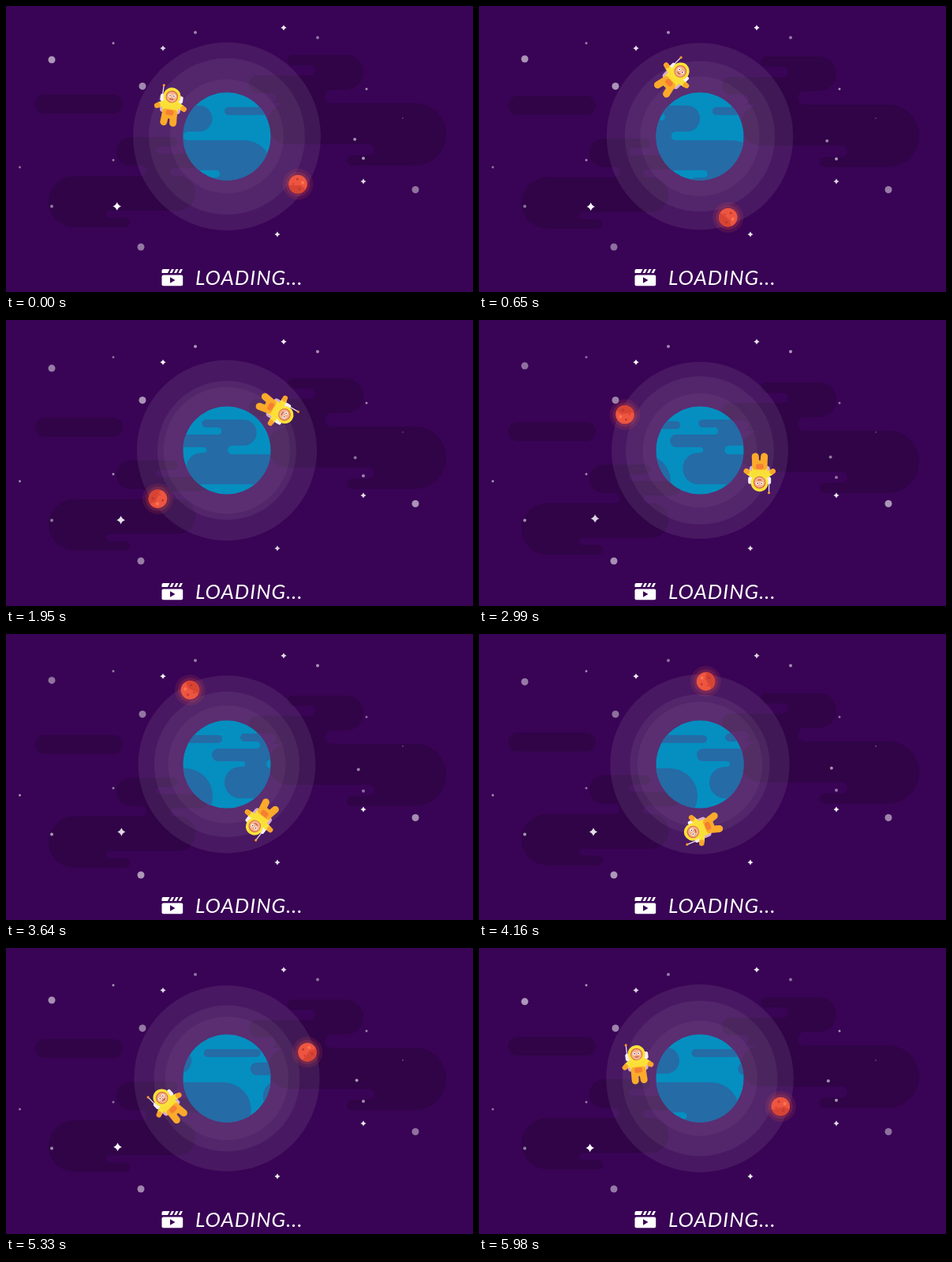
Write an HTML page that moves like this. It is 592 px wide and 362 px high and loops after 6.11 s.

```html
<!DOCTYPE html>
<html lang="en">
<head>
<meta charset="utf-8">
<title>Loading</title>
<style>
  html, body { margin: 0; width: 100%; height: 100%; overflow: hidden; background: #390455; }
  svg { display: block; width: 592px; height: 362px; }
  text { font: italic 26px Lato, "Open Sans", sans-serif; letter-spacing: 1px; fill: #fff; }
</style>
</head>
<body>
<svg viewBox="0 0 592 362">
  <defs>
    <clipPath id="globe"><circle cx="280" cy="165" r="55.7"/></clipPath>
    <g id="land"><rect x="277" y="128" width="72" height="10" rx="5"/></g>
    <path id="arm" d="M0 0H7" stroke="#fbe339" stroke-width="7"/>
    <path id="hand" d="M9 0H10.500" stroke="#fba52d" stroke-width="6.500"/>
    <path id="leg" d="M0 0V13" stroke="#fbaa2b" stroke-width="9"/>
  </defs>

  <g id="clouds" fill="#300447"><rect x="37" y="112" width="111" height="24" rx="12"/></g>
  <g id="stars" fill="#fff"></g>
  <g id="rings" fill="#fff" transform="translate(280 165)">
    <circle opacity=".08"/><circle opacity=".055"/><circle opacity=".04"/>
  </g>

  <g clip-path="url(#globe)">
    <circle cx="280" cy="165" r="55.7" fill="#048fc0"/>
    <g id="surface" fill="#256ba6"><use href="#land"/><use href="#land" x="-180"/></g>
  </g>

  <g id="moon">
    <g transform="translate(106.8)" fill="#ee5540">
      <circle r="19.500" opacity=".12"/>
      <circle r="15.500" opacity=".18"/>
      <circle r="11.800"/>
      <path d="M-9 7.500A11.800 11.800 0 0 0 11.800 0L4-1z" fill="#d84434"/>
      <g fill="#c23a31"><circle cx="-4" cy="-5" r="1.500"/><circle cx="5" cy="4" r="1.800"/><circle cx="-5" cy="3" r="1"/></g>
      <circle cx="4" cy="-5" r="2" fill="#fb7650"/>
    </g>
  </g>

  <g id="astronaut">
    <g transform="translate(-76 -28)" stroke-linecap="round">
      <path d="M-12-7V-24" stroke="#eadcf0" stroke-width="1.300"/>
      <circle cx="-12" cy="-25" r="1.600" fill="#f79a2b"/>
      <rect x="-13" y="-8" width="26" height="17" rx="4" fill="#d9a9d3"/>
      <rect x="-14.500" y="-14" width="29" height="9" rx="2" fill="#f6eefa"/>
      <g class="side"><g class="reach"><use href="#arm"/><use href="#hand"/></g><use class="stride" href="#leg"/></g>
      <g class="side" transform="scale(-1 1)"><g class="reach"><use href="#arm"/><use href="#hand"/></g><use class="stride" href="#leg"/></g>
      <rect x="-10" y="-9" width="20" height="22" rx="7" fill="#fbdf39"/>
      <rect x="-9.500" y="4" width="19" height="12" rx="4" fill="#fbaa2b"/>
      <rect x="-5" y="5" width="10" height="6.500" rx="2.500" fill="#f57f32"/>
      <circle cy="-12.500" r="11" fill="#fbe339"/>
      <circle cy="-12" r="7.800" fill="#d9704b"/>
      <circle cy="-11.700" r="6.600" fill="#f5b28c"/>
      <path d="M-2.700-13h0M2.700-13h0" stroke="#fff" stroke-width="3.800"/>
      <path d="M-2.500-13h0M2.500-13h0" stroke="#4a2436" stroke-width="1.600"/>
      <path d="M-2-9Q0-8 2-9" fill="none" stroke="#a54638"/>
    </g>
  </g>

  <g fill="#fff">
    <path d="M197.500 338V335a2 2 0 0 1 2-2H207.500L205 338zM210 333H213L210.500 338H207.500zM215.500 333H218.500L216 338H213zM221 333H224L221.500 338H218.500z"/>
    <rect x="197.500" y="340.500" width="26.700" height="13.700" rx="2"/>
    <path d="M208 343.300V350.700L214.500 347z" fill="#390455"/>
  </g>
  <text x="240" y="352.500">LOADING...</text>
</svg>

<script>
const STEP = 130, LOOP = 6110, DEGREES_PER_STEP = 7.5;
const get = id => document.getElementById(id);
const wave = (degrees, shift = 0) => Math.cos((degrees - shift) * Math.PI / 180);

function add(parent, tag, attributes) {
  const node = document.createElementNS("http://www.w3.org/2000/svg", tag);
  for (const name in attributes) node.setAttribute(name, attributes[name]);
  return get(parent).appendChild(node);
}

// A blob whose sides are stacked semicircles, bulging out and in by turns.
// Each edge is [outermost x, height]; right edges run down, left edges run up.
function addBlob(parent, top, right, left) {
  const side = (edges, direction) => edges.map(([x, height], i) => {
    const bulge = i % 2 ? -direction : direction, r = height / 2;
    return `H${x - bulge * r}a${r} ${r} 0 0 ${i % 2 ? 0 : 1} 0 ${direction * height}`;
  }).join("");
  const start = left.at(-1)[0] + left.at(-1)[1] / 2;
  add(parent, "path", { d: `M${start} ${top}${side(right, 1)}${side(left, -1)}z` });
}

addBlob("clouds", 166,
  [[217, 12], [190, 9], [255, 18], [208, 10], [240, 44], [127, 9], [157, 12]],
  [[54, 65], [178.5, 13], [140, 36]]);
addBlob("clouds", 62,
  [[453, 44], [404, 17], [558, 79]],
  [[432, 13], [467, 14], [332, 52], [342, 13], [308, 22], [392, 13], [357, 13]]);
addBlob("land", 126,
  [[261.5, 33], [225, 11], [337, 70]],
  [[246, 23], [271, 9], [172, 40], [198, 7], [156, 16], [217, 9], [192, 10]]);

const addDot = r => ([cx, cy]) => add("stars", "circle", { cx, cy, r });
const dots = [
  ...[[58, 63], [173, 101.5], [519, 232.5], [171, 305]].map(addDot(4.5)),
  ...[[444, 171], [453, 196], [240, 33.5], [395, 40], [58, 253.5]].map(addDot(2)),
  ...[[136, 47], [457, 105], [136, 195], [17.5, 204]].map(addDot(1.5)),
  addDot(0.7)([503, 142])
];

function addSparkle(x, y, size) {
  const waist = size / 4;
  const d = `M0 ${-size}Q${waist} ${-waist} ${size} 0Q${waist} ${waist} 0 ${size}` +
            `Q${-waist} ${waist} ${-size} 0Q${-waist} ${-waist} 0 ${-size}`;
  return add("stars", "path", { d, transform: `translate(${x} ${y})` });
}
const bigSparkle = addSparkle(0, 0, 5.3);
const sparkles = [bigSparkle,
  ...[[352, 27.5], [199, 53.5], [453, 222], [344, 289]].map(([x, y]) => addSparkle(x, y, 3.6))];

const place = (node, x, y, turn = 0) =>
  node.setAttribute("transform", `translate(${x} ${y}) rotate(${turn})`);

const twinkle = (nodes, mean, depth, angle) => nodes.forEach((node, i) =>
  node.setAttribute("opacity", mean + depth * wave(angle, i * 75)));

function draw(now) {
  const step = Math.floor(now % LOOP / STEP);
  const angle = step * DEGREES_PER_STEP;

  place(get("clouds"), 0, 8.5 - 8.5 * wave(angle));
  place(get("surface"), step * 3.75, 0);
  place(get("moon"), 281, 166.6, 33.5 + angle);
  place(get("astronaut"), 280, 165, 8 + angle);

  const splay = 0.5 + 0.5 * wave(2 * angle, 135);
  for (const arm of document.querySelectorAll(".reach")) place(arm, 8, -3, 35 - 60 * splay);
  for (const leg of document.querySelectorAll(".stride")) place(leg, 5, 8, -2 - 15 * splay);

  const [outer, middle, inner] = get("rings").children;
  outer.setAttribute("r", 115.5 + 3.5 * wave(angle));
  middle.setAttribute("r", 92.1 + 2.5 * wave(angle) + 4.4 * wave(2 * angle));
  inner.setAttribute("r", 77 - 4.75 * wave(2 * angle));

  twinkle(dots, 0.51, 0.08, angle);
  twinkle(sparkles, 0.91, 0.08, angle);

  // A few stars also drift.
  place(dots[0], 0, 5 * wave(angle));
  place(dots[4], -2.9 * wave(angle, 50), 3.5 * wave(angle, 130));
  place(dots[5], 0, -3.3 * wave(angle));
  place(bigSparkle, 143.9 - 3.2 * wave(angle, -10), 252.3 + 1.8 * wave(angle, 50));

  requestAnimationFrame(() => draw(performance.now()));
}
draw(performance.now());
</script>
</body>
</html>
```
